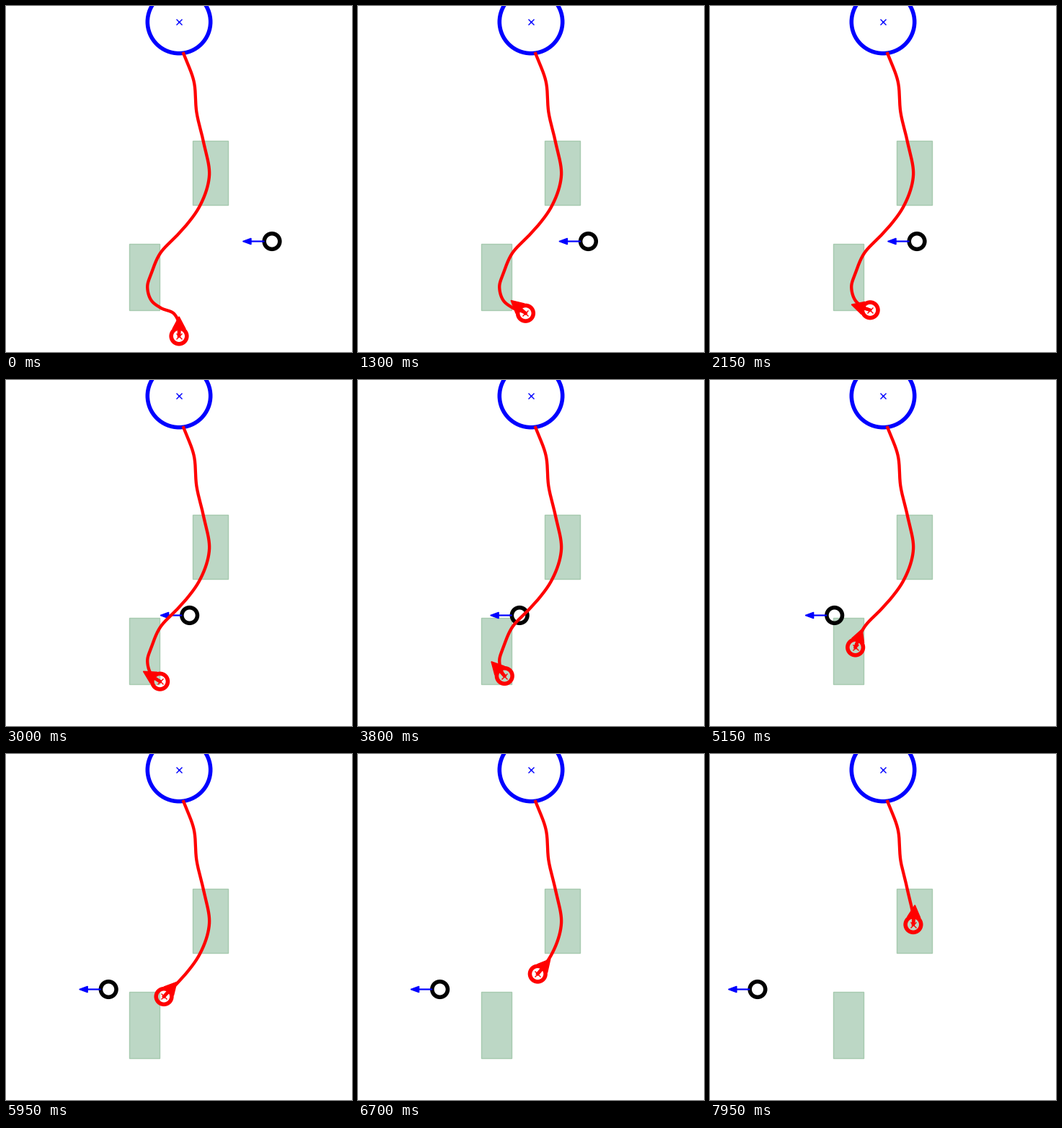
Animation of 480x480 px, one loop 8 s. Source, as a matplotlib script:

```python
import numpy as np
import matplotlib.pyplot as plt
from matplotlib.animation import FuncAnimation
from matplotlib.patches import Circle, Polygon, Rectangle

SIZE, DPI = 480, 100
FRAMES, STEP = 160, 50
UP = np.array([0, -1])
LEFT = np.array([-1, 0])

# key points of the planned route
KEYS = np.array([
    (240, 458), (240, 440), (233, 426.8), (215, 419), (202, 409),
    (196.2, 389.5), (202, 370), (213, 344.5), (238, 317.5), (251, 303),
    (268, 279), (282, 236), (274.3, 190), (264.5, 148), (260.5, 104),
    (246.3, 66),
])


def smooth(keys, n=2000):
    """Cubic Hermite curve through the keys, spaced by chord length."""
    u = np.r_[0, np.cumsum(np.hypot(*np.diff(keys, axis=0).T))]
    slopes = np.gradient(keys, u, axis=0)
    t = np.linspace(0, u[-1], n)
    i = np.clip(np.searchsorted(u, t, side="right") - 1, 0, len(u) - 2)
    h = (u[i + 1] - u[i])[:, None]
    s = (t - u[i])[:, None] / h
    return ((1 + 2 * s) * (1 - s) ** 2 * keys[i]
            + s * s * (3 - 2 * s) * keys[i + 1]
            + s * (1 - s) * h * ((1 - s) * slopes[i] - s * slopes[i + 1]))


ROUTE = smooth(KEYS)
DIST = np.r_[0, np.cumsum(np.hypot(*np.diff(ROUTE, axis=0).T))]
TANGENT = np.gradient(ROUTE, DIST, axis=0)


def along(values, d):
    return np.array([np.interp(d, DIST, v) for v in values.T])


def travelled(sec):
    """Distance when the speed swings about 36.5 px/s, slowest at 2.4 s."""
    w = np.pi / 4.8
    return 36.5 * sec - 26 / w * (1 + np.sin(w * (sec - 2.4)))


def arrow(pos, heading, start, length, head, half, shaft):
    f = heading / np.hypot(*heading)
    side = np.array([-f[1], f[0]])
    neck = length - head
    shape = [(start, shaft), (neck, shaft), (neck, half), (length, 0),
             (neck, -half), (neck, -shaft), (start, -shaft)]
    return np.array([pos + a * f + b * side for a, b in shape])


def robot_arrow(pos, heading):
    return arrow(pos, heading, 0, 27, 17, 9, 1.6)


def walker_arrow(pos):
    return arrow(pos, LEFT, 11, 40.5, 11.5, 4.2, 0.4)


fig = plt.figure(figsize=(SIZE / DPI, SIZE / DPI), dpi=DPI, facecolor="white")
ax = fig.add_axes([0, 0, 1, 1])
ax.set_xlim(0, SIZE)
ax.set_ylim(SIZE, 0)
ax.axis("off")


def ring(pos, radius, color, z):
    return ax.add_patch(Circle(pos, radius, fill=False, ec=color, lw=4,
                               zorder=z))


def cross(pos, color, z):
    return ax.plot([pos[0]], [pos[1]], "x", color=color, ms=6, mew=1,
                   zorder=z)[0]


def solid(shape, color, z):
    return ax.add_patch(Polygon(shape, fc=color, ec=color, lw=1, zorder=z))


for x, y, w, h in [(259, 187, 49, 89), (171, 330, 42, 92)]:
    ax.add_patch(Rectangle((x, y), w, h, fc="#bcd7c5", ec="#a7caaf", lw=1,
                           zorder=1))

goal = (240, 22)
ring(goal, 43.7, "blue", 2)
cross(goal, "blue", 2)

begin = np.array([369, 326.5])
walker = ring(begin, 10.8, "black", 3)
pointer = solid(walker_arrow(begin), "blue", 3)
line, = ax.plot([], [], color="red", lw=3.1, zorder=4)
robot = ring(KEYS[0], 10.8, "red", 5)
nose = solid(robot_arrow(KEYS[0], UP), "red", 5)
mark = cross(KEYS[0], "red", 6)


def draw(frame):
    sec = frame * STEP / 1000
    spot = begin + 38.12 * sec * LEFT
    walker.center = spot
    pointer.set_xy(walker_arrow(spot))

    d = travelled(sec)
    pos = along(ROUTE, d)
    line.set_data(*np.vstack([pos, ROUTE[DIST > d]]).T)
    robot.center = pos
    nose.set_xy(robot_arrow(pos, along(TANGENT, d)))
    mark.set_data([pos[0]], [pos[1]])
    return walker, pointer, line, robot, nose, mark


anim = FuncAnimation(fig, draw, frames=FRAMES, interval=STEP, repeat=True,
                     repeat_delay=0, blit=False)
plt.show()
```
